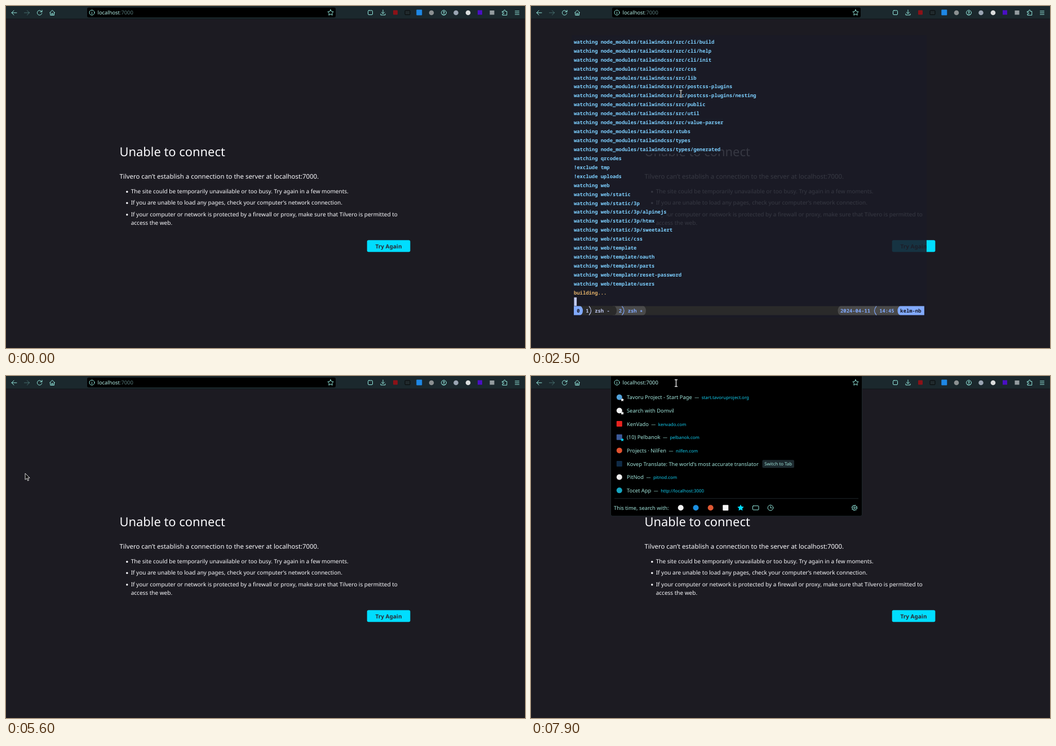
Animation, 921 px wide and 608 px high, one loop 8000 ms. Source, as an HTML page:

```html
<!DOCTYPE html>
<html lang="en">
<head>
<meta charset="utf-8">
<title>Local server start</title>
<style>
  html, body { margin: 0; width: 100%; height: 100%; overflow: hidden; background: #1c1b22; }
  svg { display: block; font-family: "Noto Sans", sans-serif; text-rendering: geometricPrecision; }
  text { white-space: pre; }
  #term text { font: bold 8.858px "Noto Sans Mono", "DejaVu Sans Mono", monospace; }
  .line { fill: none; stroke: #93e9de; stroke-width: 1; stroke-linecap: round; stroke-linejoin: round; }
  .ui { font-size: 9.33px; fill: #a0e4da; }
  .list { font-size: 10px; }
</style>
</head>
<body>
<svg width="921" height="608" viewBox="0 0 921 608">
  <rect width="921" height="608" fill="#1c1b22"/>
  <g fill="#fbfbfe">
    <text x="201.5" y="266.800" font-size="21.9">Unable to connect</text>
    <text x="201.5" y="307" font-size="11.4">Tilvero can’t establish a connection to the server at localhost:7000.</text>
    <g class="list">
      <text x="221.7" y="333">The site could be temporarily unavailable or too busy. Try again in a few moments.</text>
      <text x="221.7" y="353">If you are unable to load any pages, check your computer’s network connection.</text>
      <text x="221.7" y="373.7">If your computer or network is protected by a firewall or proxy, make sure that Tilvero is permitted to</text>
      <text x="221.7" y="389">access the web.</text>
      <circle cx="214.8" cy="330.3" r="1.7"/><circle cx="214.8" cy="350.3" r="1.7"/><circle cx="214.8" cy="371" r="1.7"/>
    </g>
  </g>
  <rect x="640.700" y="416.300" width="76.700" height="20.900" rx="2.700" fill="#00ddff"/>
  <text x="679" y="430.8" class="list" font-weight="600" text-anchor="middle" fill="#2b2a33">Try Again</text>

  <g id="term"></g>

  <rect width="921" height="23" fill="#1b282d"/>
  <rect y="22.5" width="921" height="1" fill="#101518"/>
  <rect x="144" y="2.7" width="441" height="17.6" rx="2.7" fill="#000"/>
  <g class="line">
    <path d="M19 12H10M14 8l-4 4 4 4"/>
    <path d="M32.500 12h9M37.500 8l4 4-4 4" opacity=".35"/>
    <path d="M63.300 10a4.200 4.200 0 1 0 .4 3M64 7.500v3h-3"/>
    <path d="M77.500 12l4.600-4.500 4.600 4.500M78.700 11.500V16.300h6.800V11.500M81 16v-3h2.200v3"/>
    <rect x="642.500" y="8" width="8" height="7.500" rx="1.500"/>
    <path d="M669 7v6.500M666.300 11l2.700 2.700 2.700-2.700M665 14v2h8v-2"/>
    <circle cx="777" cy="12" r="4.500"/>
    <circle cx="777" cy="10.700" r="1.200"/><path d="M774.500 14.800q2.500-2 5 0"/>
    <path d="M881 9.500h2.500v-1.200a1.300 1.300 0 0 1 2.600 0v1.200h2.700v6.800h-7.800v-2.300h1.300a1.200 1.200 0 0 0 0-2.400h-1.300z"/>
    <path d="M903.500 9h7M903.500 12h7M903.500 15h7"/>
  </g>
  <rect x="687" y="7.500" width="8" height="8" rx="1" fill="#8b1218"/>
  <rect x="708" y="8" width="9" height="7.500" rx="1" fill="#20292c" stroke="#070909"/>
  <rect x="728.300" y="6.500" width="10" height="10" rx="1" fill="#1e88e5"/>
  <circle cx="755" cy="12" r="4.300" fill="#8b9091"/>
  <circle cx="798.500" cy="12" r="4.300" fill="#9aa5b3"/>
  <circle cx="820" cy="12" r="4.300" fill="#d9dcdc"/>
  <rect x="837" y="7.500" width="8" height="8" fill="#4a0fc4"/>
  <rect x="858.500" y="8" width="8" height="7.500" fill="#949c9f"/>

  <g id="popup"></g>
  <g class="line">
    <circle cx="152.500" cy="11.700" r="4.500"/>
    <path d="M152.500 11.300v2.700M152.500 9.200v.1"/>
    <path id="star"/>
  </g>
  <rect id="select" x="162.500" y="5" width="64" height="13" fill="#17616e"/>
  <text class="ui" x="162.500" y="15" style="fill:#b3efe7">localhost<tspan id="port">:7000</tspan></text>
  <rect id="caret" x="226" y="5" width="1" height="13" fill="#b3efe7"/>

  <g id="mouse">
    <path id="arrow" d="M0 0v11.300l2.700-2.400 1.900 4.300 1.900-.9-1.900-4.100h3.600z" fill="#111" stroke="#eee" stroke-width=".9"/>
    <g id="beam" fill="none">
      <path d="M-2.500-6h5M-2.500 6h5M0-6V6" stroke="#111" stroke-width="3"/>
      <path d="M-2.500-6h5M-2.500 6h5M0-6V6" stroke="#eee" stroke-width="1.200"/>
    </g>
  </g>
</svg>
<script>
const $ = id => document.getElementById(id);
const show = (id, on) => $(id).setAttribute('display', on ? 'inline' : 'none');

const CW = 5.315, LH = 15.93, X0 = 76, Y0 = 55.7, BG = '#1a1b26';
const CYAN = '#7dcfff', BLUE = '#82aaff', WHITE = '#c0caf5', DIM = '#414868',
  AMBER = '#e0af68', GREEN = '#9ece6a', RED = '#f7768e';
const colX = c => X0 + c * CW, rowY = r => Y0 + r * LH;

// Asterisks sit at mid-height of the row.
const glyphs = (c, r, s, fill) =>
  `<text x="${colX(c)}" y="${rowY(r) + 11.1}" fill="${fill}">${s.replace(/\*+/, '<tspan dy="1.8">$&</tspan>')}</text>`;
const cells = (r, n) =>
  `<rect x="${X0}" y="${rowY(r)}" width="${n * CW}" height="${LH}" fill="${BG}"/>`;
const line = (r, s, fill) => cells(r, s.length) + glyphs(0, r, s, fill);
const lines = (list, from) => list.map((s, i) => line(from + i, s,
  s[0] == 'b' ? AMBER : s[0] == 'r' ? GREEN : CYAN)).join('');

const tail = ['web/static/css', ...['', '/oauth', '/parts', '/reset-password', '/users'].map(s => 'web/template' + s)]
  .map(s => 'watching ' + s).concat('building...');
const log = [
  ...('src/cli/build src/cli/help src/cli/init src/css src/lib src/postcss-plugins ' +
    'src/postcss-plugins/nesting src/public src/util src/value-parser stubs types types/generated')
    .split(' ').map(s => 'watching node_modules/tailwindcss/' + s),
  'watching qrcodes', '!exclude tmp', '!exclude uploads',
  ...['', '/static', '/static/3p', '/static/3p/alpinejs', '/static/3p/htmx', '/static/3p/sweetalert']
    .map(s => 'watching web' + s),
  ...tail
];

const prompt = typed => cells(0, 35 + typed.length) + [
  [0, '➜', '#73daca'], [3, 'fiber-starter', CYAN], [17, 'git:(', CYAN], [22, 'web-users', RED],
  [31, ')', CYAN], [33, '✗', AMBER], [35, typed, WHITE]
].map(([c, s, fill]) => glyphs(c, 0, s, fill)).join('');

function serverLog() {
  const stars = '*'.repeat(50);
  const plain = ['2024/04/11 14:46:01 loaded config.yaml successfully',
    ...Array(6).fill('debug   database/main.go:116    engine: postgres'),
    stars, 'server env: local', 'using DB: postgres', stars];
  const box = [
    [21, 21, 'Fiber v2.52.0', CYAN], [17, 22, 'http://127.0.0.1:7000', DIM],
    [9, 23, '(bound on host 0.0.0.0 and port 7000)', DIM],
    [3, 25, 'Handlers ............', DIM], [25, 25, '95', CYAN],
    [29, 25, 'Processes ...........', DIM], [51, 25, '1', CYAN],
    [3, 26, 'Prefork ....... Disabled', DIM], [29, 26, 'PID .............', DIM], [47, 26, '33401', CYAN]
  ];
  return lines([...tail, 'running...'], 0) +
    plain.map((s, i) => line(8 + i, s, WHITE)).join('') +
    `<rect x="${colX(1.5)}" y="${rowY(20.5)}" width="${52 * CW}" height="${7 * LH}" fill="none" stroke="#405d8a"/>` +
    box.map(a => glyphs(...a)).join('');
}

function cursor(c, r, hollow) {
  const style = hollow ? `fill="none" stroke="${WHITE}" stroke-width=".9"` : `fill="${WHITE}"`;
  return `<rect x="${colX(c) + .4}" y="${rowY(r) + .4}" width="${CW - .6}" height="${LH - .8}" ${style}/>`;
}

// Block with one rounded end: from the flat side to the tip.
function pill(flat, tip, fill) {
  const d = Math.sign(tip - flat), y = rowY(30);
  return `<path d="M${flat} ${y}H${tip - 5 * d}a5 ${LH / 2} 0 0 ${d > 0 ? 1 : 0} 0 ${LH}H${flat}z" fill="${fill}"/>`;
}
const arc = (x, bend, color) =>
  `<path d="M${x} ${rowY(30)}q${bend} ${LH / 2} 0 ${LH}" fill="none" stroke="${color}" stroke-width="1.1"/>`;

function statusBar(late) {
  const y = 30, end = colX(117);
  return `<rect x="${X0}" y="${rowY(y)}" width="${117 * CW}" height="${LH}" fill="#2a2a2a"/>` +
    pill(145, 204, '#4a4a4a') + pill(85, 152, '#2a2a2a') + pill(X0, 92, BLUE) +
    pill(655, 544.5, '#4a4a4a') + pill(end, 650.5, BLUE) +
    arc(103, 7, WHITE) + arc(161.500, 7, BLUE) + arc(613, -7, BLUE) +
    [[1, '0', '#15161e'], [4, '1', WHITE], [7, 'zsh -', WHITE], [15, '2', BLUE],
     [18, late ? 'air *' : 'zsh *', BLUE], [89, '2024-04-11', BLUE],
     [102, late ? '14:46' : '14:45', BLUE], [109, 'kelm-nb', '#15161e']]
      .map(([c, s, fill]) => glyphs(c, y, s, fill)).join('');
}

function terminal(t, hollow) {
  const typed = 'air'.slice(0, t < 2000 ? 0 : t < 2200 ? 1 : t < 2300 ? 2 : 3);
  const body = t < 2400 ? prompt(typed) + cursor(35 + typed.length, 0, hollow)
    : (t < 2500 ? prompt(typed) + lines(log.slice(0, 28), 1) : t < 5100 ? lines(log, 0) : serverLog()) +
      cursor(0, 29, hollow);
  return `<rect x="72" y="52" width="630" height="502" fill="${BG}" opacity=".87"/>` + body + statusBar(t >= 4600);
}

function star(x, y, r) {
  const pts = Array.from({ length: 10 }, (_, i) => {
    const a = i * Math.PI / 5, k = i % 2 ? r * .5 : r;
    return `${x + k * Math.sin(a)} ${y - k * Math.cos(a)}`;
  });
  return `M${pts.join('L')}z`;
}
const dot = (x, y, fill) => `<circle cx="${x}" cy="${y}" r="5" fill="${fill}"/>`;
const square = (x, y, fill) => `<rect x="${x - 5}" y="${y - 5}" width="10" height="10" rx="1" fill="${fill}"/>`;

function popup() {
  const rows = [
    ['Tavoru Project - Start Page', 'start.tavoruproject.org', dot, '#51a2da', '#fff'],
    ['Search with Domvil', '', dot, '#f4f4f4', '#fff'],
    ['KenVado', 'kenvado.com', square, '#e8231f'],
    ['(10) Pelbanok', 'pelbanok.com', square, '#3b5998', '#00ddff'],
    ['Projects · NilFen', 'nilfen.com', dot, '#e2522f'],
    ['Kovep Translate: The world’s most accurate translator', '', square, '#0f2b46'],
    ['PitNod', 'pitnod.com', dot, '#f0f0f0'],
    ['Tocet App', 'http://localhost:3000', dot, '#16a5c0']
  ];
  const list = rows.map(([title, url, icon, fill, badge], i) => {
    const y = 37.800 + i * 23.65;
    const link = url && `<tspan dx="4.5" font-size="8">—</tspan><tspan dx="4.5" font-size="7.9" fill="#12cdef">${url}</tspan>`;
    return icon(156.800, y, fill) + (badge ? `<path d="${star(162, y + 4.700, 3.200)}" fill="${badge}"/>` : '') +
      `<text class="ui" x="170" y="${y + 3.500}">${title}${link}</text>`;
  }).join('');
  return `<path d="M141.500 0H587.500V246q0 3-3 3H144.500q-3 0-3-3z" fill="#000" stroke="#222e33" stroke-width=".8"/>` + list +
    `<rect x="410.500" y="149.300" width="56.500" height="14" rx="2" fill="#1d2a2f"/>
     <text x="438.700" y="159.200" font-size="7.9" text-anchor="middle" fill="#a0e4da">Switch to Tab</text>
     <path d="M148 217.800H581" stroke="#263237" stroke-width=".8"/>
     <text class="ui" x="147" y="237.700">This time, search with:</text>` +
    dot(265.700, 234.300, '#f4f4f4') + dot(292.500, 234.300, '#1b8fe0') + dot(318.700, 234.300, '#de5833') +
    square(345.300, 234.300, '#f4f4f4') +
    `<path d="${star(372, 234.500, 6)}" fill="#00ddff"/>
     <g class="line"><rect x="393.500" y="230.800" width="10.500" height="7.200" rx="1"/>
     <circle cx="425" cy="234.300" r="4.800"/><path d="M425 231.500v3h2.300"/>
     <circle cx="574" cy="234.300" r="4"/><circle cx="574" cy="234.300" r="1.500"/>
     <circle cx="574" cy="234.300" r="5" stroke-dasharray="1.500 2.427" stroke-linecap="butt"/></g>`;
}

const path = [
  [400, 258, 20], [1000, 266, 156], [3500, 266, 156], [3600, 265, 157], [3700, 264, 157], [3900, 264, 157],
  [4000, 251, 157], [4100, 247, 159], [4200, 247, 159], [4900, 34, 173], [5700, 34, 173],
  [5800, 48, 173], [5900, 48, 173], [6400, 261, 14], [6500, 257.500, 12.700], [8000, 257.500, 12.700]
];
function mouseAt(t) {
  const i = path.findIndex(p => p[0] > t);
  if (i < 1) return [path[0][1], path[0][2]];
  const [a, b] = [path[i - 1], path[i]], k = (t - a[0]) / (b[0] - a[0]);
  return [a[1] + (b[1] - a[1]) * k, a[2] + (b[2] - a[2]) * k];
}

function draw(t) {
  const [x, y] = mouseAt(t), open = t >= 900 && t < 5600, focus = t >= 6700;
  $('term').innerHTML = open ? terminal(t, x < 72) : '';
  show('popup', focus);
  show('select', focus && t < 7600);
  show('caret', t >= 7600 && t < 7900);
  $('port').setAttribute('fill', focus ? '#b3efe7' : '#587b7c');
  const beam = y < 23 || (open && x > 72);
  show('mouse', t >= 400);
  show('beam', beam);
  show('arrow', !beam);
  $('mouse').setAttribute('transform', `translate(${x} ${y})`);
}

$('star').setAttribute('d', star(576, 11.900, 5.400));
$('popup').innerHTML = popup();
let last = -1;
const start = performance.now();
function tick() {
  const t = Math.floor((performance.now() - start) % 8000 / 100) * 100;
  if (t !== last) draw(last = t);
  requestAnimationFrame(tick);
}
tick();
</script>
</body>
</html>
```
